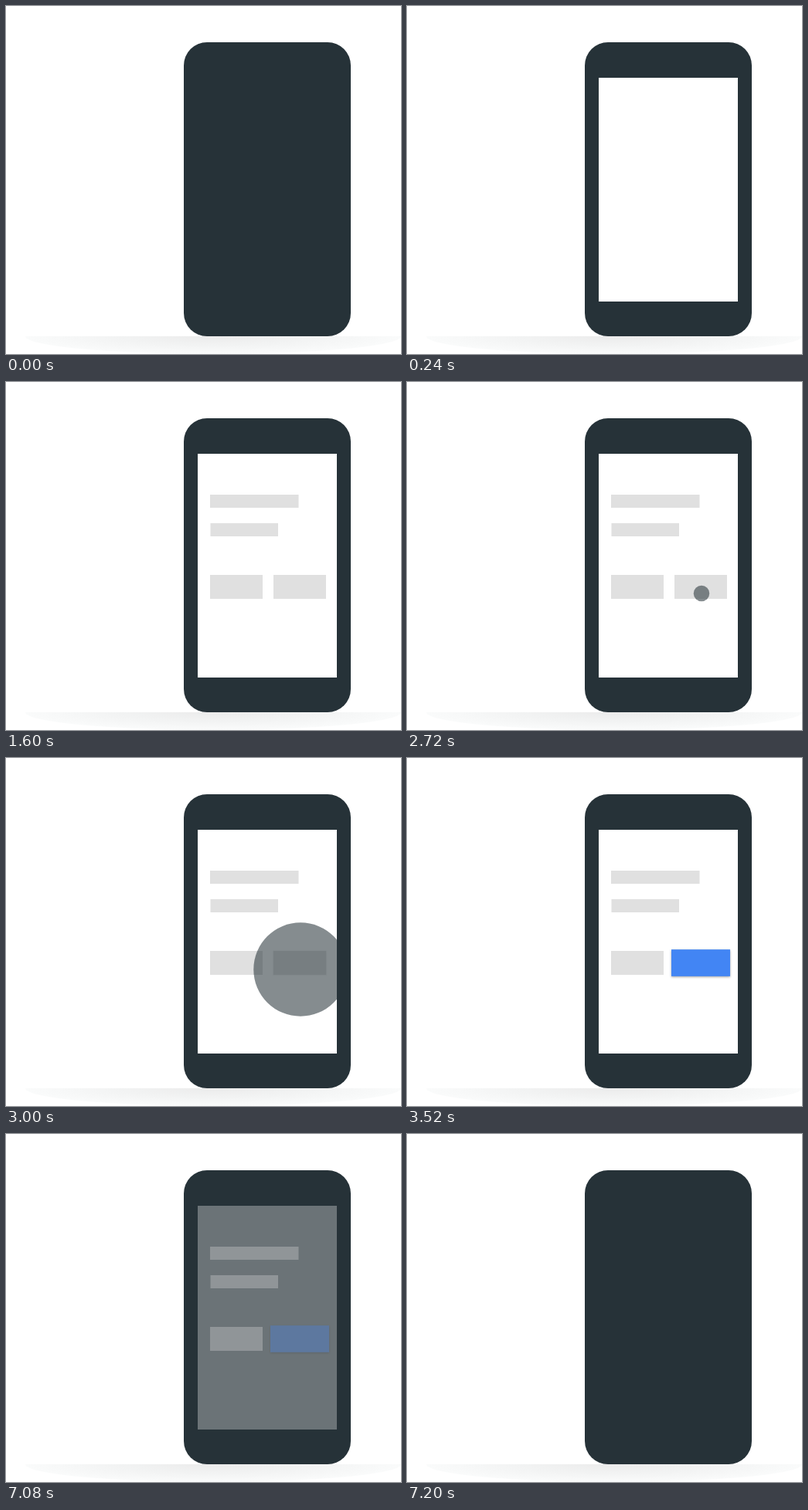
An HTML page that plays this animation: 511 px wide and 451 px high, repeating every 9.44 s.

```html
<!DOCTYPE html>
<html lang="en">
<head>
<meta charset="utf-8">
<title>Phone tap</title>
<style>
  html, body { margin: 0; width: 100%; height: 100%; overflow: hidden; background: #fff; }
  svg { display: block; width: 511px; height: 451px; }
</style>
</head>
<body>
<svg viewBox="0 0 511 451">
  <defs>
    <radialGradient id="ground" gradientUnits="userSpaceOnUse" cx="0" cy="0" r="1"
      gradientTransform="translate(268 428) scale(243 23)">
      <stop offset="0" stop-color="#ebebeb"/>
      <stop offset=".5" stop-color="#f2f3f3"/>
      <stop offset="1" stop-color="#fafbfb"/>
    </radialGradient>
    <clipPath id="display"><rect x="248" y="93" width="180" height="290"/></clipPath>
    <filter id="soft" x="-20%" y="-40%" width="140%" height="180%">
      <feGaussianBlur stdDeviation="1.3"/>
    </filter>
  </defs>

  <path d="M25 428H511A243 23 0 0 1 25 428Z" fill="url(#ground)"/>
  <rect x="230" y="47" width="216" height="381" rx="30" fill="#263238"/>

  <g clip-path="url(#display)">
    <rect id="screen" x="248" y="93" width="180" height="290" fill="#fff"/>
    <g id="content" fill="#e0e0e0">
      <rect class="block" x="264" y="146" width="114.5" height="17"/>
      <rect class="block" x="264.5" y="183" width="87.5" height="17"/>
      <rect class="block" x="264" y="250" width="68" height="31"/>
      <g class="block" id="button">
        <rect id="shadow" x="346" y="251" width="68" height="31" fill="#000" filter="url(#soft)"/>
        <rect id="face" x="346" y="250" width="68" height="31"/>
      </g>
    </g>
    <circle id="ripple" cx="381" cy="274" fill="#263238"/>
  </g>
</svg>

<script>
const LOOP = 9440, STEP = 40;
const $ = id => document.getElementById(id);
const blocks = document.querySelectorAll('.block');

const progress = (t, start, end) => Math.min(1, Math.max(0, (t - start) / (end - start)));
const easeOut = p => 1 - (1 - p) ** 2;
const easeInOut = p => p * p * (3 - 2 * p);
const mix = (a, b, p) => a.map((v, i) => Math.round(v + (b[i] - v) * p));

function draw(t) {
  const leaving = 1 - easeInOut(progress(t, 6880, 7200));
  $('screen').setAttribute('opacity', Math.min(progress(t, 0, 240), leaving));
  $('content').setAttribute('opacity', leaving);

  // Placeholder blocks appear one after another.
  blocks.forEach((block, i) => {
    const start = 520 + i * 200;
    block.setAttribute('opacity', easeInOut(progress(t, start, start + 480)));
  });

  // The tap spreads and fades while the button lifts and turns blue.
  $('ripple').setAttribute('r', 74 * easeOut(progress(t, 2680, 3235)));
  $('ripple').setAttribute('opacity', 0.56 * (1 - progress(t, 3000, 3320)));

  const lift = easeInOut(progress(t, 2900, 3520));
  const scale = 1 + 0.118 * lift;
  $('button').setAttribute('transform',
    `translate(380 265.5) scale(${scale}) translate(-380 -265.5)`);
  $('shadow').setAttribute('opacity', 0.35 * lift);
  const tint = easeInOut(progress(t, 3000, 3520));
  $('face').setAttribute('fill', `rgb(${mix([224, 224, 224], [66, 133, 244], tint)})`);
}

const origin = performance.now();
function tick() {
  const t = (performance.now() - origin) % LOOP;
  draw(Math.floor(t / STEP) * STEP);
  requestAnimationFrame(tick);
}
tick();
</script>
</body>
</html>
```
